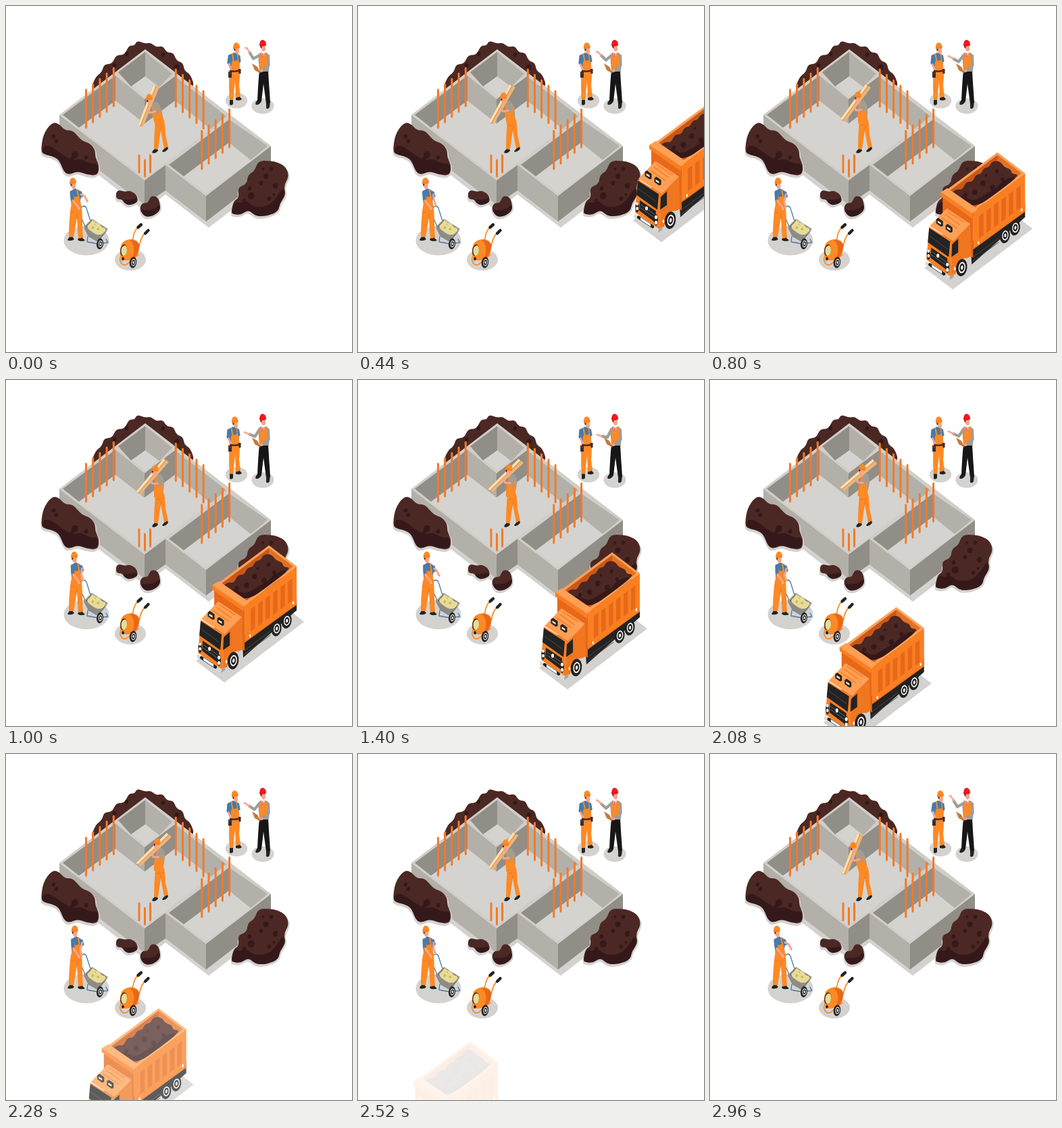
These frames come from a looping animation (512x512 px, 3000 ms). An HTML page:

```html
<!DOCTYPE html>
<html lang="en">
<head>
<meta charset="utf-8">
<title>Construction site</title>
<style>
html, body { margin: 0; width: 100%; height: 100%; overflow: hidden; background: #fff; }
svg { display: block; width: 100vw; height: 100vh; }
</style>
</head>
<body>
<svg id="stage" viewBox="0 0 512 512"></svg>
<script>
const C = {
  orange: '#f97f22', deep: '#e8681a', pale: '#ffa056', work: '#fc8a25',
  rim: '#d0cec8', floor: '#d4d3d0', light: '#b2b0a9', dark: '#918d87', shade: '#d3d2cf',
  soil: '#4b2823', soilDark: '#35191a', black: '#232323', skin: '#f5a58c',
  blue: '#477aa8', grey: '#a09d96', bar: '#f37a28', sand: '#e6dc96', red: '#f5161e'
};

// Shape helpers, each returns markup
const poly = (fill, pts, more = '') => `<polygon fill="${fill}" points="${pts}" ${more}/>`;
const path = (fill, d) => `<path fill="${fill}" d="${d}"/>`;
const line = (color, width, d, more = '') =>
  `<path fill="none" stroke="${color}" stroke-width="${width}" stroke-linecap="round" stroke-linejoin="round" d="${d}" ${more}/>`;
const oval = (fill, x, y, rx, ry = rx, turn = 0) =>
  `<ellipse fill="${fill}" cx="${x}" cy="${y}" rx="${rx}" ry="${ry}" transform="rotate(${turn} ${x} ${y})"/>`;
const group = (id, body) => `<g id="${id}">${body}</g>`;

// Closed soft outline through the midpoints of a rough polygon
function blob(fill, text, dx = 0, dy = 0) {
  const p = text.split(' ').map(s => s.split(',').map(Number)).map(([x, y]) => [x + dx, y + dy]);
  const mid = (a, b) => `${(a[0] + b[0]) / 2},${(a[1] + b[1]) / 2}`;
  const n = p.length;
  return path(fill, `M${mid(p[n - 1], p[0])}` +
    p.map((a, i) => `Q${a} ${mid(a, p[(i + 1) % n])}`).join('') + 'Z');
}

const lumps = (text, fill = C.soilDark) => text.split(' ').map(s => {
  const [x, y, r] = s.split(',').map(Number);
  return blob(fill, `${x - r},${y - r * .3} ${x},${y - r * 1.2} ${x + r * 1.2},${y - r * .8} ${x + r},${y + r} ${x - r * .5},${y + r * 1.1}`);
}).join('');

const wheel = (x, y, rx, ry) => oval(C.black, x, y, rx, ry, 8) +
  oval('#fff', x + .6, y, rx * .62, ry * .64, 8) + oval(C.black, x + .6, y, rx * .45, ry * .48, 8) +
  oval('#fff', x + .6, y, rx * .2, ry * .24, 8);

const bars = (count, x, top, bottom, dx, dy) => Array.from({ length: count }, (_, i) =>
  line(C.bar, 3, `M${x + dx * i},${top + dy * i}V${bottom + dy * i}`)).join('');

function mounds() {
  const left = '52,212 55,190 67,173 77,173 87,184 98,184 106,192 113,200 124,203 132,213 132,224 138,236 136,251 120,250 106,244 94,250 86,246 80,230 72,223 54,219';
  const right = '333,305 337,288 345,284 343,268 356,264 358,250 368,244 373,229 390,229 402,231 414,238 419,252 411,266 414,280 405,292 403,304 386,311 369,311 359,301 348,309 336,308';
  const small = '162,278 166,272 176,275 184,273 194,280 195,290 184,295 176,293 172,286 164,286';
  const round = '197,300 202,291 210,292 214,281 224,282 228,292 228,303 217,311 205,312';
  return [left, right, small, round].map(s => blob(C.shade, s, -1, 4) + blob(C.shade, s, 2, 2)).join('') +
    blob(C.soil, left) + blob(C.soilDark, '54,208 64,206 76,214 86,222 98,228 112,226 124,234 136,232 137,249 120,249 106,244 94,249 86,246 80,230 72,223 54,219') +
    lumps('70,193,3 74,200,3 101,220,5 118,224,3 97,226,3') +
    blob(C.soil, right) + blob(C.soilDark, '334,305 338,289 346,292 356,288 364,296 378,298 390,294 400,284 410,268 414,279 405,292 403,304 386,311 369,311 359,301 348,309 336,308') +
    lumps('384,252,4 392,241,3 377,262,3 398,266,4 362,281,5 389,285,3 352,288,3 360,270,3 380,241,2 396,279,2') +
    blob(C.soil, small) + blob(C.soilDark, '172,286 182,287 194,284 195,290 184,295 176,293') +
    blob(C.soil, round) + blob(C.soilDark, '198,301 208,302 220,301 228,292 228,303 217,311 205,312');
}

function building() {
  return blob(C.soil, '124,128 132,105 142,98 145,86 157,86 163,72 175,73 182,58 190,59 194,51 206,56 214,54 222,61 232,59 238,69 248,69 252,81 262,84 264,96 273,101 280,122 250,150 160,150') +
    lumps('160,88,3 178,71,3 232,72,3 252,91,4') +
    poly(C.shade, '79,190 79,205 205,303 236,279 300,328 395,255 392,235') +
    poly(C.light, '79,161 205,258 205,294 79,198') +
    poly(C.dark, '205,258 236,235 236,273 205,294') +
    poly(C.light, '236,235 296,281 296,319 236,273') +
    poly(C.dark, '296,281 392,207 392,245 296,319') +
    poly(C.rim, '206,64 392,207 296,281 236,235 205,258 79,161') +
    // top room
    poly(C.floor, '206,103 227,119 207,134 185,118') +
    poly(C.dark, '166,98 206,68 206,104 185,119') +
    poly(C.light, '206,68 246,100 227,120 206,104') +
    // main room
    poly(C.floor, '161,140 205,172 250,139 303,181 236,232 205,254 107,180') +
    poly(C.dark, '84,161 162,103 162,140 108,180') +
    poly(C.light, '162,103 205,138 205,174 162,140') +
    poly(C.dark, '205,138 250,104 250,140 205,174') +
    poly(C.light, '250,104 326,163 303,182 250,140') +
    // right room
    poly(C.floor, '330,201 364,228 296,277 261,251') +
    poly(C.dark, '241,235 330,168 330,202 263,252') +
    poly(C.light, '330,168 387,207 362,228 330,202') +
    bars(5, 118.5, 124, 180, 10.2, -8) + bars(5, 251.3, 94, 149, 10.2, 8) +
    bars(5, 289.8, 185, 241, 10.2, -8) + bars(1, 197, 221, 246, 0, 0) +
    bars(1, 213.5, 221, 246, 0, 0) + bars(1, 205.5, 228, 252, 0, 0);
}

const helmet = (x, y, color) =>
  path(color, `M${x - 5},${y + 3}Q${x - 5},${y - 6} ${x},${y - 6}Q${x + 5},${y - 5} ${x + 5},${y + 2}Q${x + 1},${y + 5} ${x - 5},${y + 3}Z`) +
  line('#0002', .8, `M${x - 4},${y + 2}Q${x},${y + 1} ${x + 4},${y + 1}`);
const head = (x, y, color) => path(C.skin, `M${x - 3},${y}H${x + 4}L${x + 4},${y + 8}Q${x + 3},${y + 12} ${x},${y + 11}L${x - 3},${y + 7}Z`) +
  path('#533029', `M${x - 4},${y + 2}h2.5v4h-2Z`) + helmet(x, y, color);

function carrier() {
  return path(C.black, 'M216,217Q217,213 221,211L225,213Q225,216 219,218ZM231,215Q234,210 239,208L240,211Q237,216 232,216Z') +
    path(C.work, 'M221,170L234,168Q236,180 236,190L240,208L234,211L229,184L225,212L219,212Q219,190 221,170Z') +
    line(C.deep, .7, 'M229,184L230,178M222,177L234,175') +
    group('carrierTop',
      path(C.grey, 'M214,145L222,141Q228,146 230,153L232,163L219,166Z') +
      path(C.work, 'M215,156L220,160L228,157L230,160Q233,164 234,176L221,177Z') +
      line(C.work, 2, 'M217,147L220,161M225,147L228,160') +
      group('planks', poly('#c98445', '195,177 202,178 226,121 218,117') +
        poly('#ffe0b0', '195,177 199,177 222,119 218,117') + poly('#eeb577', '199,177 203,178 227,120 223,118') +
        line('#d48845', .8, 'M199,177L222,118')) +
      head(212, 136, C.work) +
      line(C.grey, 4.5, 'M225,147L221,157') + line(C.skin, 3, 'M221,156L213,158L211,154') +
      oval(C.skin, 211, 155, 2, 2.5));
}

function barrow() {
  return line(C.blue, 1.3, 'M110,299Q116,293 119,299L125,318M121,341L120,349L136,352L151,350L148,345M106,301L117,326') +
    poly('#6d6b68', '115,327 122,341 136,349 151,331 138,342') + poly('#8d8b87', '115,327 138,342 136,349 122,341') +
    poly('#96938e', '127,315 151,330 139,343 115,327') + poly('#5d5c59', '127,317 148,330 138,340 118,327') +
    blob(C.sand, '118,327 124,322 128,316 133,321 138,321 141,327 150,330 140,340 131,337') +
    lumps('128,328,2 136,330,2 132,323,1', '#c8bc66') + wheel(139, 352, 5, 8);
}

function pusher() {
  return oval(C.shade, 119, 347, 33.5, 22) + barrow() +
    path(C.black, 'M91,346Q93,342 97,340L101,345Q98,348 92,347ZM106,345L111,341L117,347Q112,349 107,347Z') +
    path(C.work, 'M96,297L112,296Q113,312 113,322L114,343L107,344L105,314L100,342L93,342Q93,318 96,297Z') +
    line(C.deep, .7, 'M105,314L105,306M96,305L100,306') +
    group('pusherTop',
      path(C.blue, 'M95,274L102,270Q110,272 112,278L110,288L111,298L97,298Z') +
      path(C.work, 'M98,284L108,281L112,298L96,299Z') + line(C.work, 2, 'M97,274L101,286M105,272L108,284') +
      line(C.blue, 4.5, 'M110,276L112,281') + head(99, 260, C.work) +
      line(C.blue, 5, 'M97,276L98,286') + line(C.skin, 3.2, 'M99,288L108,299') + oval(C.skin, 108, 300, 2, 2)) +
    line(C.skin, 3, '', 'id="freeArm"');
}

function mixer() {
  return oval(C.shade, 184, 375.5, 23, 16) +
    line(C.work, 1.8, 'M187,352Q188,336 193,330L196,327M197,356Q200,341 205,337M170,370Q167,378 172,382Q178,386 185,376L196,368') +
    line(C.black, 4.4, 'M195.5,327.5L200,323.5M206,336.5L210.5,332') +
    path(C.work, 'M171,352Q176,345 186,345Q195,346 197,353Q198,364 191,372Q183,378 174,376Q168,369 169,360Z') +
    path(C.deep, 'M183,346Q194,356 186,376Q198,368 197,353Q194,346 183,346Z') +
    oval('#6b3715', 174, 361.5, 5, 9, 10) + blob(C.sand, '170,360 174,354 179,355 179,366 174,371 171,367') +
    oval(C.black, 173, 374, 2, 2.5) + wheel(188, 379.5, 5.2, 8.3);
}

function listener() {
  return oval(C.shade, 341, 140, 16.2, 11.5) +
    path(C.black, 'M331,139L336,138L336,145Q334,148 331,146ZM340,136L345,133L349,138Q346,141 340,139Z') +
    path(C.work, 'M331,97L346,96Q346,110 345,118L347,134L340,136L339,112L336,139L331,139Q329,116 331,97Z') +
    group('listenerTop',
      path(C.blue, 'M331,72L337,69L343,70Q346,74 346,79L345,97L332,97Z') +
      path(C.work, 'M334,82L345,80L346,97L332,98Z') + line(C.work, 2, 'M335,71L337,84M343,71L344,82') +
      line(C.blue, 4.5, 'M331,74L329.5,84') + line(C.skin, 3, 'M330,86L333,95') +
      line(C.blue, 3, 'M345,74L346,82') + head(341, 60, C.work)) +
    line('#47302b', 2.6, 'M332,96Q339,98 346,95') +
    path('#3b2a2a', 'M329,97h5v9h-5ZM344,93h3.5v7h-3Z') + oval(C.red, 331, 99, 1, 1);
}

function foreman() {
  return oval(C.shade, 380, 148, 16.5, 11.5) +
    path(C.black, 'M369,145Q370,140 374,138L378,141Q375,147 370,146ZM385,142L391,142L390,150Q387,154 385,151Z') +
    path('#161616', 'M375,95L388,95Q389,115 390,127L391,143L385,144L381,115L378,141L372,141Q373,115 375,95Z') +
    path(C.grey, 'M373,72L378,68L385,69Q391,71 390,80L389,97L375,97Z') +
    path(C.work, 'M376,71L379,69L386,71L386,91L375,94Z') + poly('#fff', '378,68 383,68 380,78') +
    line(C.red, 1.2, 'M380,70V76') + head(380, 56, C.red) +
    line(C.grey, 4.4, 'M388,74L388.5,88L380,95') +
    poly('#c47a38', '364,85 372,90 377,100 368,95') + oval(C.skin, 378, 96, 2.5, 2) +
    line(C.grey, 4.2, '', 'id="sleeve"') + line(C.skin, 2.4, '', 'id="hand"');
}

function truck() {
  const sideTop = x => 304 - (x - 390) * .74;
  const ribs = Array.from({ length: 6 }, (_, i) => {
    const a = 399 + i * 11, b = a + 6.5;
    return poly(C.deep, [[a, sideTop(a) + 13], [b, sideTop(b) + 13], [b, sideTop(b) + 46], [a, sideTop(a) + 46]]);
  }).join('');
  const lamp = (x, y) => poly(C.black, `${x - 5},${y - 5} ${x - 2},${y - 7} ${x + 5},${y - 2} ${x + 5},${y + 5} ${x + 2},${y + 6} ${x - 5},${y + 1}`) +
    poly('#ffe6b5', `${x - 3},${y - 3} ${x + 2},${y} ${x + 2},${y + 3} ${x - 3},${y}`);
  return poly(C.shade, '318,387 360,419 478,329 438,298') +
    poly(C.black, '386,350 467,292 467,312 388,382') +
    line('#4a4a4a', 1, 'M390,371L428,343M390,377L428,349') +
    wheel(437, 339, 7.5, 11.5) + wheel(452, 327.5, 7.5, 11.5) +
    // bed
    poly(C.orange, '390,304 467,247 467,304 390,360') + ribs +
    line(C.deep, 1, 'M390,359L467,303') +
    poly(C.deep, '345,278 390,305 390,372 345,340') +
    poly(C.pale, '349,273 426,216 467,247 390,304') +
    poly('#c9581a', '355,273 426,220 461,247 391,299') + poly('#e47122', '426,220 461,247 455,253 426,231') +
    blob(C.soil, '355,278 366,270 374,272 380,259 389,260 394,249 402,248 406,239 414,238 418,229 430,229 436,238 446,241 447,248 460,249 428,274 391,300') +
    blob(C.soilDark, '364,281 378,281 390,288 403,282 412,275 424,270 434,257 458,250 428,274 391,300') +
    lumps('392,275,4 404,262,4 418,268,4 378,279,3 425,244,3 409,250,2 433,256,3 397,288,3') +
    poly(C.pale, '342,275 352,269 397,300 389,307') + poly(C.orange, '342,275 389,307 389,314 342,281') +
    oval('#fff', 398, 350, 1.2, 2.4) + oval('#fff', 462, 301, 1.2, 2.4) +
    // cab
    poly(C.pale, '326,325 351,299 386,322 361,348') + line(C.orange, 1.6, 'M349,308L370,323M353,304L376,319M344,313L366,328') +
    poly(C.orange, '325,326 360,348 357,400 321,375') +
    path('#f07720', 'M360,348L386,322L387,370L381,373Q370,370 364,396L357,400Z') +
    poly(C.black, '325,328 356,348 354,371 323,349') + line('#4b4b4b', 1, 'M326,340L352,359') +
    poly(C.black, '359,352 368,344 368,364 358,371') + line(C.deep, .8, 'M358,375L369,366V342') +
    poly(C.black, '328,357 352,373 351,390 327,372') + line('#777', .8, 'M329,363L350,378M329,368L350,383') +
    oval('#fff', 338, 369, 2, 3) +
    oval(C.black, 324, 367, 2.6, 8) + oval('#fff', 324, 362, 1.8, 2.6) + oval('#fff', 324, 369, 1.8, 2.6) +
    oval(C.black, 352, 386, 2.8, 8.5) + oval('#fff', 352, 382, 2, 2.8) + oval('#fff', 352, 390, 2, 2.8) +
    poly('#d9d8d4', '320,377 356,399 355,405 319,382') + poly('#aaa8a2', '356,399 362,395 361,401 355,405') +
    line(C.black, 4.5, 'M326,382L347,396') + poly('#fff', '329,382 344,392 344,396 329,386') +
    lamp(340.5, 320) + lamp(354.5, 329) + wheel(373, 386.5, 8.2, 13) + oval('#fff', 363, 388, 1.3, 2.6);
}

const stage = document.getElementById('stage');
stage.innerHTML = building() + mounds() + carrier() + pusher() + mixer() + listener() + foreman() + group('truck', truck());

const part = id => document.getElementById(id);
const set = (id, name, value) => part(id).setAttribute(name, value);
const turn = (id, angle, x, y) => set(id, 'transform', `rotate(${angle} ${x} ${y})`);
const span = (t, a, b) => Math.min(1, Math.max(0, (t - a) / (b - a)));
const ease = u => (1 - Math.cos(Math.PI * u)) / 2;
const mix = (a, b, u) => a + (b - a) * u;

function draw(t) {
  // slow lean shared by both labourers, then a quicker return
  const lean = t < 2000 ? Math.sin(Math.PI / 2 * t / 2000) ** 1.2 : 1 - ease(span(t, 2080, 2960));
  turn('carrierTop', 22 * lean, 233, 168);
  turn('planks', 6 * lean, 211, 147);
  turn('pusherTop', 4.5 * lean, 103, 300);

  const lower = ease((t % 1500) / 750);
  const sx = 111 + 2 * lean;
  set('freeArm', 'd', `M${sx},279L${mix(116, 110, lower)},${mix(281, 290, lower)}L${mix(120.5, 112, lower)},${mix(289, 298, lower)}`);

  turn('listenerTop', -3.6 * ease(span(t, 0, 440)) * (1 - ease(span(t, 2360, 2960))), 339, 97);

  const wave = Math.sin(Math.PI * t / 3000) ** 1.5;
  const ex = mix(366, 369, wave), ey = mix(78, 85, wave);
  const hx = mix(357, 356, wave) - 6 * wave * (1 - wave), hy = mix(63, 82, wave);
  const wx = mix(hx, ex, .4), wy = mix(hy, ey, .4);
  set('sleeve', 'd', `M375,73L${ex},${ey}L${wx},${wy}`);
  set('hand', 'd', `M${wx},${wy}L${hx},${hy}m0,-.5l-2.5,-.5`);

  // truck brakes to a stop, waits, then drives off at constant speed
  const away = 198 * (1 - ease(span(t, 0, 1200)));
  const gone = Math.max(0, t - 1680) * .25;
  set('truck', 'transform', `translate(${-50 + away - gone} ${39 - away * .78 + gone * .807})`);
  set('truck', 'opacity', span(t, 20, 360) * (1 - span(t, 2180, 2560)));
}

function tick(now) {
  draw(now % 3000);
  requestAnimationFrame(tick);
}
draw(0);
requestAnimationFrame(tick);
</script>
</body>
</html>
```
